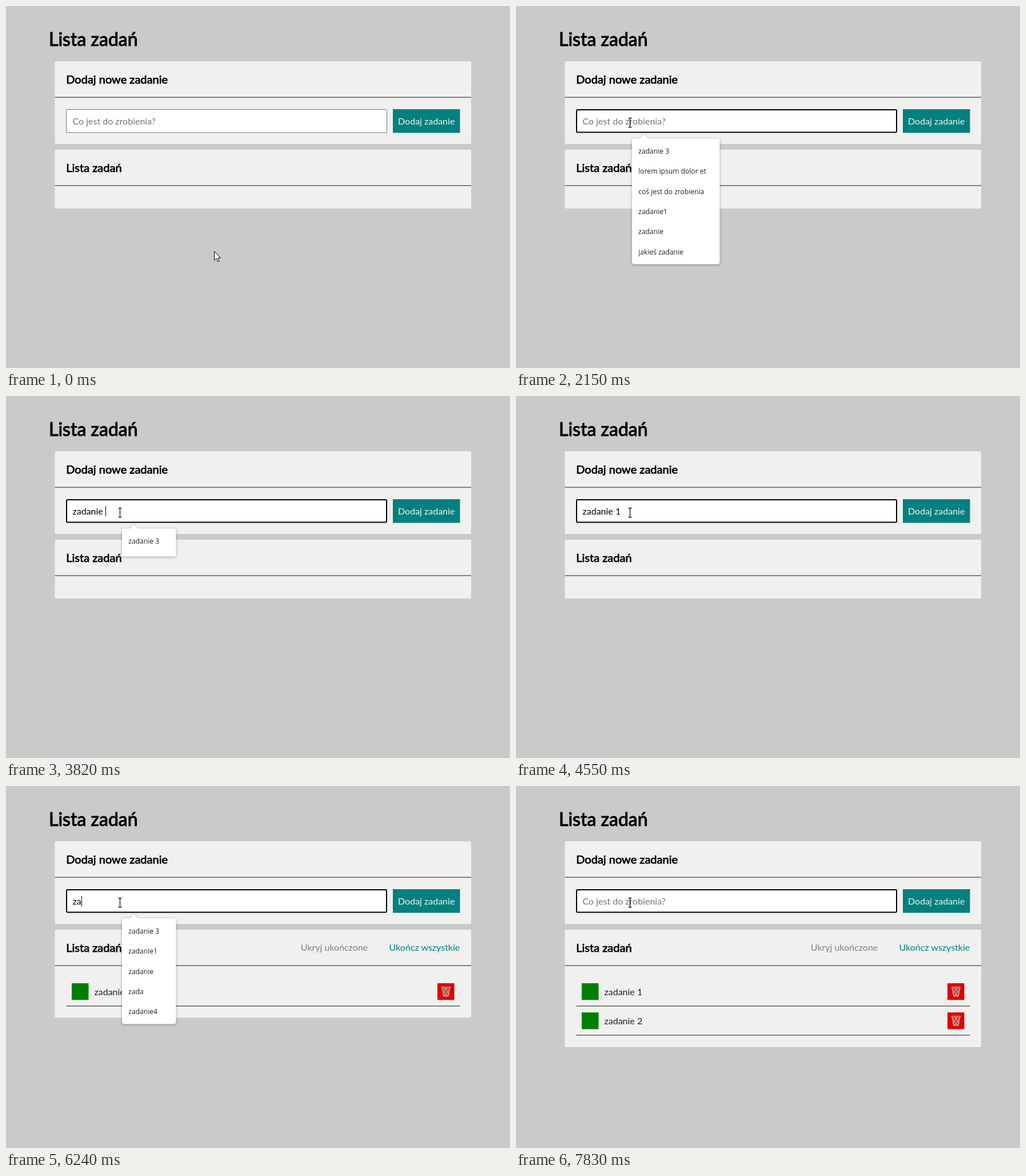
These frames come from a looping animation (882x635 px, 8000 ms). An HTML page:

```html
<!DOCTYPE html>
<html lang="pl">
<head>
<meta charset="utf-8">
<style>
html, body { margin: 0; width: 100%; height: 100%; overflow: hidden; background: #c9cbca; }
svg { display: block; width: 882px; height: 635px; }
text { font: 16px Lato, sans-serif; white-space: pre; }
.title { font-size: 32px; stroke: #000; stroke-width: 1.05px; }
.head { font-size: 20px; stroke: #000; stroke-width: .75px; }
.card { fill: #f0f0ee; }
.line { fill: #777; }
#popup { filter: drop-shadow(0 1px 2px #0005); }
#popup text { font: 12.1px "Open Sans", sans-serif; fill: #222; }
</style>
</head>
<body>
<svg viewBox="0 0 882 635">
  <defs>
    <g id="task">
      <rect x="115" y="346" width="29.5" height="29.3" fill="#008000"/>
      <rect x="755" y="346" width="29.5" height="29.3" fill="#e00000"/>
      <path d="M763 354.5l2.5 14.5h9l2.5-14.5z" fill="#9995"/>
      <path d="M762.5 352.5h15v2h-15zM763.3 354.5l2.4 14.5h8.6l2.4-14.5M763.5 356l9 13M768 354.500l6.500 9M764.500 363l4 6M776.500 356l-9 13M772 354.500l-6.500 9M775.500 363l-4 6" fill="none" stroke="#c9bcbc"/>
      <rect class="line" x="105.500" y="385" width="689" height="1.800"/>
    </g>
  </defs>
  <rect width="882" height="635" fill="#c9cbca"/>
  <text class="title" x="75" y="69.500">Lista zadań</text>

  <rect class="card" x="85.500" y="97" width="728.500" height="145" rx="2"/>
  <rect class="line" x="85.500" y="159.300" width="728.500" height="1.800"/>
  <text class="head" x="105.300" y="136">Dodaj nowe zadanie</text>
  <rect id="field" fill="#fff"/>
  <text id="input" x="116.500" y="208"></text>
  <rect id="caret" y="193" width="1" height="18"/>
  <rect x="677" y="181" width="117.500" height="41.500" fill="#008080"/>
  <text x="735.700" y="208" text-anchor="middle" fill="#f1f1ef">Dodaj zadanie</text>

  <rect id="list" class="card" x="85.500" y="252" width="728.500" rx="2"/>
  <rect class="line" x="85.500" y="314.200" width="728.500" height="1.800"/>
  <text class="head" x="105.300" y="291">Lista zadań</text>
  <g id="links">
    <text x="633.300" y="289" text-anchor="end" fill="#808080">Ukryj ukończone</text>
    <text x="794.300" y="289" text-anchor="end" fill="#008080">Ukończ wszystkie</text>
  </g>
  <g id="task1"><use href="#task"/><text x="154.500" y="366.500" fill="#222">zadanie 1</text></g>
  <g id="task2" transform="translate(0 51.200)"><use href="#task"/><text x="154.500" y="366.500" fill="#222">zadanie 2</text></g>

  <g id="popup">
    <path id="box" fill="#fff"/>
    <g id="items"></g>
  </g>

  <path id="arrow" d="M.5 .5v15.800l3.600-3.400 2.500 5.600 2.500-1.100-2.400-5.400h4.800z" fill="#fff" stroke="#000"/>
  <path id="beam" d="M-3-8h2.500l.5.500.5-.5H3M0-7.500v15M-3 8h2.500l.5-.5.5.5H3" fill="none" stroke="#000" stroke-width="1.200"/>
</svg>
<script>
const $ = id => document.getElementById(id);
const set = (id, attrs) => { for (const k in attrs) $(id).setAttribute(k, attrs[k]); };
const show = (id, on) => { $(id).style.display = on ? '' : 'none'; };
const clamp = v => Math.max(0, Math.min(1, v));
// Value of the last key whose time has passed
const at = (keys, t) => keys.reduce((v, [time, value]) => t >= time ? value : v, keys[0][1]);

const LOOP = 8000, FOCUS = 1160, ADDED = [4780, 7830];
const BLINKS = [FOCUS, 2150, 2680, 4550, 5100, 5640, 6100, 7760];

const typed = (word, times) => times.map((time, i) => [time, word.slice(0, i + 1)]);
const TEXT = [
  [0, ''],
  ...typed('zadanie 1', [2820, 2905, 3075, 3160, 3440, 3530, 3620, 3820, 4050]), [ADDED[0], ''],
  ...typed('zadanie 2', [6100, 6240, 6510, 6560, 6710, 6800, 6890, 7030, 7260]), [ADDED[1], '']
];

const HINTS = {
  all: ['zadanie 3', 'lorem ipsum dolor et', 'coś jest do zrobienia', 'zadanie1', 'zadanie', 'jakieś zadanie'],
  five: ['zadanie 3', 'zadanie1', 'zadanie', 'zada', 'zadanie4'],
  four: ['zadanie 3', 'zadanie1', 'zadanie', 'zadanie4'],
  cut: ['zadanie 3'],
  one: ['zadanie 3']
};
const POPUP = [
  [0, 'all'], [2905, 'five'], [3440, 'four'], [3820, 'cut'], [3900, 'one'],
  [5000, 'five'], [6710, 'four'], [7030, 'cut'], [7100, 'one']
];
const FADES = [[1550, 1750, 4050, 4220], [6060, 6240, 7260, 7440]];

let shown;
function drawPopup(t) {
  const alpha = Math.max(...FADES.map(([a, b, c, d]) =>
    Math.min(clamp((t - a) / (b - a)), clamp((d - t) / (d - c)))));
  $('popup').style.opacity = alpha;
  show('popup', alpha > 0);
  const mode = at(POPUP, t);
  if (mode === shown) return;
  shown = mode;
  const hints = HINTS[mode];
  const right = mode === 'all' ? 356.5 : 297.5;
  const bottom = mode === 'cut' ? 281.500 : 240.500 + 35.4 * hints.length;
  const r = mode === 'cut' ? 0 : 4;
  set('box', { d: `M207 232.500H216.500L224 225L231.500 232.500H${right - 4}q4 0 4 4V${bottom - r}q0 ${r} ${-r} ${r}H${203 + r}q${-r} 0 ${-r} ${-r}V236.500q0-4 4-4z` });
  $('items').innerHTML = hints.map((s, i) => `<text x="214.300" y="${258.800 + 35.4 * i}">${s}</text>`).join('');
}

function drawPointer(t) {
  const step = Math.max(0, Math.min(12, Math.floor((t - 430) / 66.3) + 1));
  const k = step / 12, u = k * k * (3 - 2 * k), v = 1 - u;
  const curve = (a, b, c, d) => v * v * v * a + 3 * v * v * u * b + 3 * v * u * u * c + u * u * u * d;
  const x = curve(364, 330, 215, 199.5), y = curve(430, 300, 110, 204.7);
  const inField = y < 222;
  show('arrow', !inField);
  show('beam', inField);
  set(inField ? 'beam' : 'arrow', { transform: `translate(${x} ${y})` });
}

function draw(t) {
  const focused = t >= FOCUS;
  const w = focused ? 2 : 1;
  set('field', {
    x: 105 + w / 2, y: 181 + w / 2, width: 562 - w, height: 41.5 - w,
    rx: focused ? 2 : 1, stroke: focused ? '#000' : '#767676', 'stroke-width': w
  });

  const text = at(TEXT, t), input = $('input');
  input.textContent = text;
  const width = text ? input.getComputedTextLength() : 0;
  if (!text) input.textContent = 'Co jest do zrobienia?';
  input.setAttribute('fill', text ? '#000' : '#757575');
  set('caret', { x: Math.round(116.5 + width) });
  show('caret', BLINKS.filter(b => t >= b).length % 2);

  const count = ADDED.filter(a => t >= a).length;
  set('list', { height: 103.3 + 51.3 * count });
  show('links', count);
  show('task1', count);
  show('task2', count > 1);

  drawPopup(t);
  drawPointer(t);
}

function frame() {
  draw(performance.now() % LOOP);
  requestAnimationFrame(frame);
}
frame();
</script>
</body>
</html>
```
